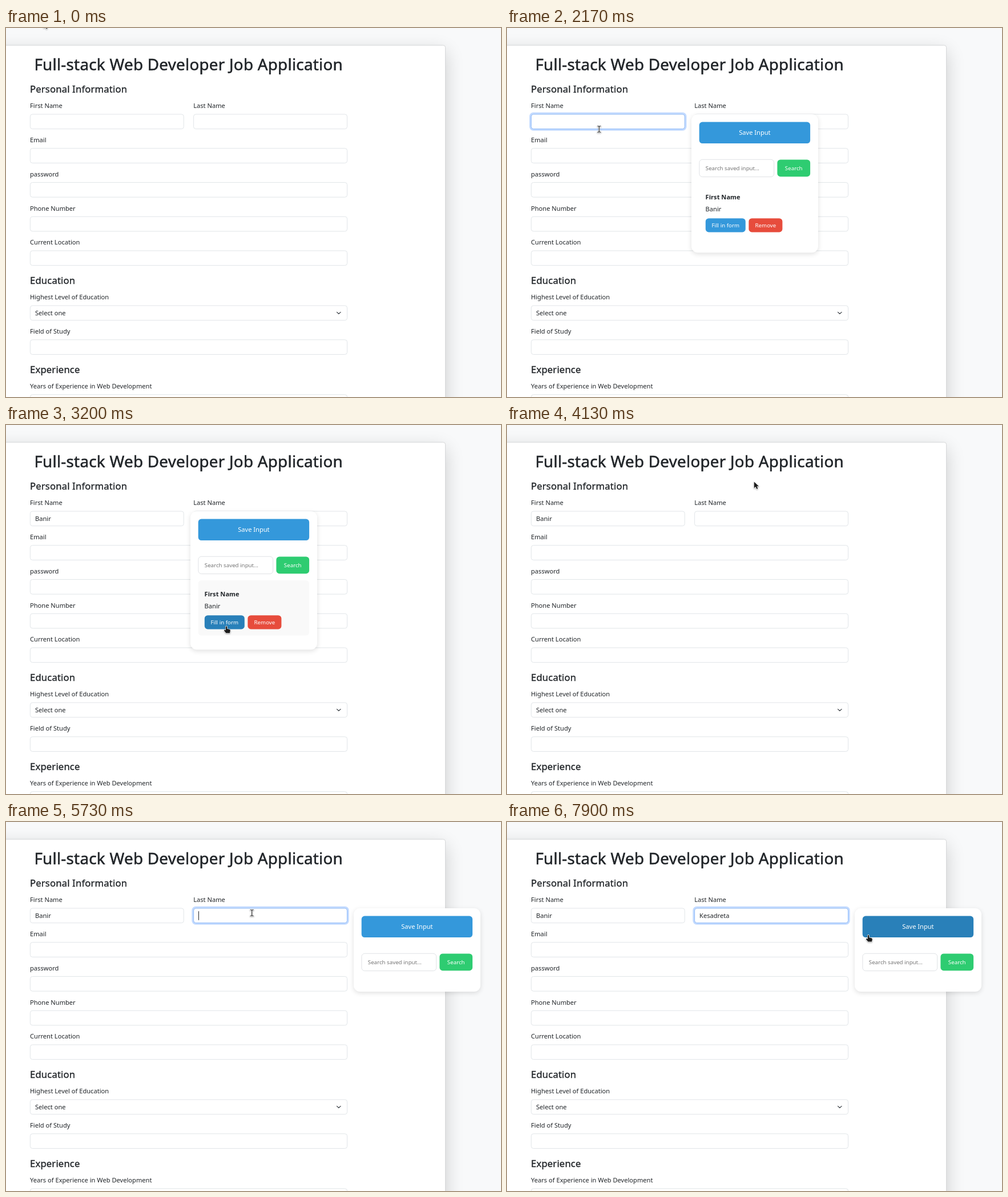
Write an HTML page that moves like this. It is 867x646 px and loops after 8000 ms.

```html
<!DOCTYPE html>
<html lang="en">
<head>
<meta charset="utf-8">
<title>Job application form</title>
<style>
  html, body { margin: 0; width: 100%; height: 100%; overflow: hidden; background: #f8f9fa; }
  svg { display: block; width: 867px; height: 646px; font-family: "Noto Sans", "Open Sans", sans-serif; }
  text { fill: #212529; white-space: pre; }
  .mid { text-anchor: middle; fill: #fff; }
  /* medium weight built from the regular face */
  .medium { stroke: #212529; stroke-width: .02em; letter-spacing: .0092em; }
  .cursor path { stroke-linejoin: round; stroke-linecap: round; }
</style>
</head>
<body>
<svg id="stage" viewBox="0 0 867 646"></svg>
<script>
const LOOP = 8000;
const BODY = 11.12, SMALL = 9.73, HEAD = 16.68, TITLE = 27.8;
const FIRST = "Banir", LAST = "Kesadreta";
const BLUE = "#3498db", DARK_BLUE = "#2980b9";
const stage = document.getElementById("stage");

function add(parent, tag, attrs, content) {
  const node = document.createElementNS("http://www.w3.org/2000/svg", tag);
  for (const key in attrs) node.setAttribute(key, attrs[key]);
  if (content) node.textContent = content;
  return parent.appendChild(node);
}
const group = (parent, attrs) => add(parent, "g", attrs);
const box = (parent, x, y, width, height, rx, fill, attrs) =>
  add(parent, "rect", { x, y, width, height, rx, fill, ...attrs });
const label = (parent, x, y, size, content, attrs) =>
  add(parent, "text", { x, y, "font-size": size, ...attrs }, content);
const show = (node, on) => { node.style.display = on ? "" : "none"; };

// Page card
box(stage, -60, 41, 830, 760, 4, "#000", { opacity: 0.175, style: "filter:blur(16.7px)" });
box(stage, -60, 30.2, 829.6, 760, 4, "#fff", { stroke: "#d2d3d5", "stroke-width": 0.9 });

function field(x, y, width, name) {
  label(stage, x, y - 10.2, BODY, name);
  box(stage, x + 0.4, y + 0.4, width - 0.8, 25.7, 4, "#fff", { stroke: "#dee2e6", "stroke-width": 0.9 });
}
const heading = (y, name) => label(stage, 42, y, HEAD, name, { class: "medium" });

label(stage, 319.7, 74, TITLE, "Full-stack Web Developer Job Application",
  { class: "medium", "text-anchor": "middle" });
heading(113, "Personal Information");
field(42, 150.6, 269.7, "First Name");
field(328.2, 150.6, 269.7, "Last Name");
["Email", "password", "Phone Number", "Current Location"].forEach((name, i) =>
  field(42, 210.3 + i * 59.75, 556, name));
heading(448, "Education");
field(42, 485.6, 556, "Highest Level of Education");
label(stage, 51, 502.9, BODY, "Select one");
add(stage, "path", { d: "M579.5 497.3l3.3 3.2 3.3-3.2", fill: "none", stroke: "#343a40",
  "stroke-width": 1.1, "stroke-linecap": "round", "stroke-linejoin": "round" });
field(42, 545.4, 556, "Field of Study");
heading(604, "Experience");
field(42, 641.4, 556, "Years of Experience in Web Development");

// Focus outlines, typed values and caret
function focusRing(x) {
  const ring = group(stage);
  box(ring, x - 1.4, 149.2, 272.5, 29.2, 5.6, "none",
    { stroke: "#0d6efd", "stroke-opacity": 0.25, "stroke-width": 2.8 });
  box(ring, x + 0.4, 151, 268.9, 25.7, 4, "none", { stroke: "#86b7fe", "stroke-width": 0.9 });
  return ring;
}
const firstRing = focusRing(42), lastRing = focusRing(328.2);
const firstValue = label(stage, 51, 167.8, BODY, FIRST);
const lastValue = label(stage, 337, 167.8, BODY, "");
const caret = box(stage, 51, 156.2, 1, 15.6, 0, "#212529");

// Saved-input popup
function button(parent, x, y, width, height, fill, name, size) {
  const face = box(parent, x, y, width, height, 5.5, fill);
  label(parent, x + width / 2, y + height / 2 + size * 0.36, size, name, { class: "mid" });
  return face;
}
function makePopup(dx, height) {
  const root = group(stage, { transform: `translate(${dx} 0)` });
  box(root, 323, 153.5, 222, height, 11, "#000", { opacity: 0.12, style: "filter:blur(4.5px)" });
  box(root, 323, 151, 222, height, 11, "#fff");
  const save = button(root, 336.7, 164.6, 194.4, 37.4, BLUE, "Save Input", BODY);
  box(root, 336.9, 230.2, 130.8, 30.4, 5.5, "#fff", { stroke: "#dcdfe2", "stroke-width": 0.9 });
  label(root, 347.8, 249, SMALL, "Search saved input...", { style: "fill:#757575" });
  button(root, 473.4, 230.5, 57.7, 29.7, "#2ecc71", "Search", SMALL);
  return { root, save };
}
const firstPopup = makePopup(0, 242.3), lastPopup = makePopup(286, 146);
const itemBack = box(firstPopup.root, 336.7, 272, 194.4, 96.5, 5.5, "#f9f9f9");
label(firstPopup.root, 347.6, 300.3, BODY, "First Name", { "font-weight": 700 });
label(firstPopup.root, 347.6, 321.2, BODY, FIRST);
const fill = button(firstPopup.root, 347.8, 333.2, 70, 24.2, BLUE, "Fill in form", SMALL);
button(firstPopup.root, 423.4, 333.2, 59, 24.2, "#e74c3c", "Remove", SMALL);

// Mouse pointers, each drawn around its hot spot
const cursor = group(stage, { class: "cursor", style: "filter:drop-shadow(0.4px 1px 1px rgba(0,0,0,.35))" });
const solid = { fill: "#1b1b1b", stroke: "#fff", "stroke-width": 1.3, "paint-order": "stroke" };
const beamPath = "M-2.6-5.3Q0-5.4 0-3.8Q0-5.4 2.6-5.3M0-4V4M-2.6 5.3Q0 5.4 0 3.8Q0 5.4 2.6 5.3";
const beam = group(cursor);
[["#fff", 2.6], ["#222", 1.1]].forEach(([stroke, width]) =>
  add(beam, "path", { d: beamPath, fill: "none", stroke, "stroke-width": width }));
const shapes = {
  arrow: add(cursor, "path", { d: "M0 0V11L2.6 8.6 4.6 12.6 6.6 11.7 4.8 7.8H8.3Z", ...solid }),
  hand: add(cursor, "path", {
    d: "M-1.2 1Q0-.5 1.2 1V4.8L5.4 5.8Q7 6.3 6.8 8L6 12.2H-.6L-3.9 8Q-4.2 6.4-2.7 6.6L-1.2 7.6Z", ...solid }),
  beam
};

// time, x, y, pointer; linear between rows, equal times make a jump
const moves = [
  [0, 66, -11, "arrow"], [370, 66, -11, "arrow"], [590, 84, 48, "beam"], [690, 96, 82, "arrow"],
  [850, 110, 148, "beam"], [970, 115.4, 173.6, "beam"],
  [2165, 115.4, 173.6, "beam"], [2165, 160, 176, "beam"], [2200, 168, 182, "arrow"],
  [2310, 203, 210, "beam"], [2410, 237, 237, "arrow"], [2530, 280, 270, "beam"],
  [2640, 323, 300, "arrow"], [2800, 370, 333, "hand"], [2930, 386, 352, "hand"],
  [3530, 386, 352, "hand"], [3530, 383, 310, "arrow"], [3700, 383, 310, "arrow"],
  [3735, 394, 250, "arrow"], [3810, 420, 165, "arrow"], [3900, 432.8, 99.5, "arrow"],
  [4235, 432.8, 99.5, "arrow"], [4360, 431.5, 150, "beam"], [4430, 430.7, 159, "beam"],
  [7500, 430.7, 159, "beam"], [7500, 535.5, 165, "beam"],
  [7730, 535.5, 165, "beam"], [7730, 625, 196.5, "arrow"],
  [7895, 625, 196.5, "arrow"], [7895, 633, 197.4, "hand"], [LOOP, 633, 197.4, "hand"]
];
const typing = [[6095, 2], [6365, 3], [6530, 4], [6830, 6], [7000, 7], [7230, 9]];
const blinks = [[1195, 1800], [2330, 2865], [4665, 5200], [5725, 7730]];

const within = (t, from, to) => t >= from && t < to;
const ramp = (t, start) => Math.min(1, Math.max(0, (t - start) / 150));
const eased = (t, start) => { const p = ramp(t, start); return p * p * (3 - 2 * p); };

function pointer(t) {
  let i = moves.length - 2;
  while (moves[i][0] > t) i--;
  const [t0, x0, y0, shape] = moves[i], [t1, x1, y1] = moves[i + 1];
  const p = (t - t0) / (t1 - t0);
  return { x: x0 + (x1 - x0) * p, y: y0 + (y1 - y0) * p, shape };
}

function render(t) {
  const { x, y, shape } = pointer(t);
  cursor.setAttribute("transform", `translate(${x} ${y})`);
  for (const name in shapes) show(shapes[name], name === shape);

  firstRing.setAttribute("opacity", eased(t, 1215) - eased(t, 3015));
  lastRing.setAttribute("opacity", eased(t, 4550));
  show(firstValue, t >= 3030);

  const typed = typing.reduce((n, [at, count]) => t >= at ? count : n, 0);
  const value = LAST.slice(0, typed);
  if (lastValue.textContent !== value) lastValue.textContent = value;
  const caretX = t < 4000 ? 51 : 337 + (typed ? lastValue.getComputedTextLength() : 0);
  caret.setAttribute("x", caretX);
  show(caret, blinks.some(([from, to]) => within(t, from, to)));

  show(firstPopup.root, within(t, 1235, 4125));
  show(lastPopup.root, t >= 4600);
  show(itemBack, within(t, 2680, 3735));
  fill.setAttribute("fill", within(t, 2800, 3730) ? DARK_BLUE : BLUE);
  lastPopup.save.setAttribute("fill", t >= 7895 ? DARK_BLUE : BLUE);
}

const start = performance.now();
function tick() {
  render((performance.now() - start) % LOOP);
  requestAnimationFrame(tick);
}
tick();
</script>
</body>
</html>
```
